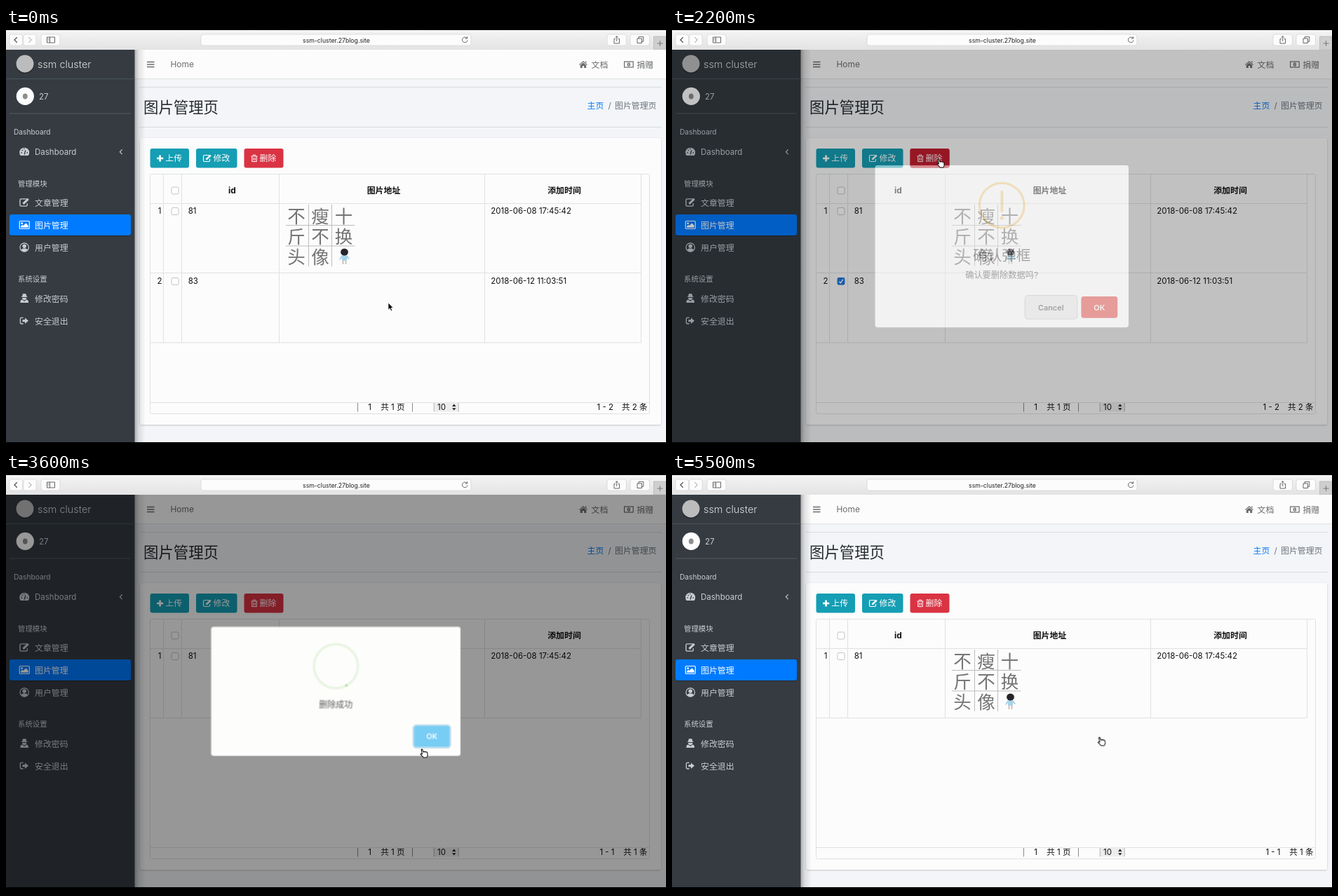
An HTML page that plays this animation: 941 px wide and 595 px high, repeating every 5.8 s.

```html
<!DOCTYPE html>
<html lang="zh-CN">
<head>
<meta charset="utf-8">
<title>ssm cluster</title>
<style>
html, body { margin: 0; width: 100%; height: 100%; overflow: hidden; background: #000; }
svg { display: block; width: 941px; height: 595px; }
text { font: 11.9px Inter, "Noto Sans CJK SC", "Noto Sans CJK", sans-serif; white-space: pre; }
.mid { text-anchor: middle; }
.end { text-anchor: end; }
.nav { fill: #c8ccd3; color: #c8ccd3; }
.nav .latin { font-size: 11.5px; }
.nav .head { font-size: 10.4px; }
.on { fill: #fff; color: #fff; }
.top { fill: #6a6c6e; color: #6a6c6e; }
.btn { fill: #fff; color: #fff; font-weight: 500; }
.btn text { font-weight: 500; }
.cell { fill: #111; }
.cell text { font-size: 11.5px; }
.cell .th { font-size: 11.9px; font-weight: 700; }
.grid { stroke: #dfe1e3; fill: none; }
.box { fill: #fff; stroke: #c4c4c4; }
.pic text { font-size: 25.5px; font-weight: 500; fill: #747474; text-anchor: middle; }
.modal { transform-origin: 470.25px 311.5px; }
.modal .act { font-size: 10.6px; font-weight: 600; text-anchor: middle; }
.tick { fill: #a5dc86; transform-box: fill-box; transform-origin: center; }
#tip { transform: rotate(45deg); }
#long { transform: rotate(-45deg); }
</style>
</head>
<body>
<svg viewBox="0 0 941 595">
  <defs>
    <linearGradient id="bar" x2="0" y2="1">
      <stop stop-color="#f5f4f5"/><stop offset="1" stop-color="#e4e3e4"/>
    </linearGradient>
    <linearGradient id="shade">
      <stop stop-color="#000" stop-opacity=".3"/><stop offset=".4" stop-color="#000" stop-opacity=".1"/><stop offset="1" stop-color="#000" stop-opacity="0"/>
    </linearGradient>
    <filter id="soft" x="-5%" y="-5%" width="110%" height="110%">
      <feDropShadow dx="0" dy=".8" stdDeviation="1.1" flood-opacity=".22"/>
    </filter>
    <g id="edit" fill="none" stroke="currentColor">
      <path d="M3 -4.5H-4Q-5.5 -4.5 -5.5 -3V3Q-5.5 4.5 -4 4.5H2Q3.5 4.5 3.5 3V1" stroke-width="1.2"/>
      <path d="M-1.6 1.6L4.8 -4.4" stroke-width="2.6"/>
    </g>
    <g id="photo">
      <rect x="-7" y="-5.5" width="14" height="11" rx="1.2" fill="none" stroke="currentColor" stroke-width="1.2"/>
      <circle cx="-3.6" cy="-2.3" r="1.4" fill="currentColor"/>
      <path d="M-5.3 3.8V2L-3 -.2L-1.6 1.1L2 -2.5L5.3 .8V3.8Z" fill="currentColor"/>
    </g>
  </defs>

  <!-- browser bar -->
  <rect width="941" height="595"/>
  <rect y="3" width="941" height="28" fill="url(#bar)"/>
  <g fill="#fcfcfc" stroke="#d6d5d6" stroke-width=".8">
    <rect x="5" y="9" width="18.6" height="16" rx="3"/>
    <rect x="24.8" y="9" width="18.4" height="16" rx="3"/>
    <rect x="50" y="9" width="27" height="16" rx="3"/>
    <rect x="278" y="9" width="385" height="16" rx="3"/>
    <rect x="857" y="9" width="27.5" height="16" rx="3"/>
    <rect x="890" y="9" width="27.5" height="16" rx="3"/>
  </g>
  <path d="M923.5 31V12H941V31Z" fill="#cfcecf" stroke="#b9b8b9" stroke-width=".8"/>
  <g fill="none" stroke="#555">
    <path d="M15.8 13.2L12 17L15.8 20.8" stroke-width="1.3"/>
    <path d="M32.4 13.2L36.2 17L32.4 20.8" stroke="#bbb" stroke-width="1.2"/>
    <path d="M58.5 13H69.5V21H58.5ZM62.5 13V21M59.8 15H61.3M59.8 17H61.3" stroke-width=".9"/>
    <path d="M657.2 14.5A3.8 3.8 0 1 0 658 17.5M657.6 12.2V15H654.8" stroke-width=".9"/>
    <path d="M868.8 15.5H867V22H874.5V15.5H872.7M870.75 19V11.8M868.8 13.6L870.75 11.6L872.7 13.6" stroke-width=".9"/>
    <path d="M900 15H906.5V21.5H900ZM902 15V12.6H908.8V19.2H906.5" stroke-width=".9"/>
    <path d="M928.5 22H936.5M932.5 18V26" stroke="#777"/>
  </g>
  <text class="mid" x="471" y="20.6" fill="#222" style="font-size:8.7px">ssm-cluster.27blog.site</text>

  <!-- page -->
  <rect y="31" width="941" height="560" fill="#f3f5f8"/>
  <rect x="183" y="31" width="758" height="41" fill="#fcfcfc"/>
  <path d="M183 72.5H941" stroke="#dfe2e5"/>
  <g class="top">
    <path d="M201 48.5H211.5M201 52H211.5M201 55.5H211.5" stroke="currentColor" stroke-width="1.5"/>
    <text x="234.5" y="56.2">Home</text>
    <path d="M817 52.3L823 47L829 52.3L828.2 53.1L823 48.6L817.8 53.1ZM818.8 53L823 49.5L827.2 53V57H824.2V54H821.8V57H818.8ZM826 47.4H827.5V50L826 48.7Z"/>
    <text x="834.5" y="56.5">文档</text>
    <rect x="881.6" y="48" width="12.6" height="8" fill="none" stroke="currentColor" stroke-width="1.2"/>
    <ellipse cx="887.9" cy="52" rx="2.2" ry="2.8"/>
    <path d="M887.9 50.3V53.6" stroke="#fff"/>
    <text x="899.3" y="56.5">捐赠</text>
  </g>
  <path d="M190 84.5H935M190 141.5H935" stroke="#d9dcdf"/>
  <text x="196" y="120.5" fill="#272b2f" style="font-size:21.4px;font-weight:500">图片管理页</text>
  <text x="828.5" y="114.7" fill="#0a7cf5">主页</text>
  <text x="858.5" y="114.7" fill="#6c757d">/</text>
  <text x="868" y="114.7" fill="#6c757d">图片管理页</text>

  <rect x="191" y="157" width="743" height="409" rx="3" fill="#fcfcfc" filter="url(#soft)"/>
  <rect x="205.5" y="172" width="55.5" height="27.5" rx="3" fill="#159eb4"/>
  <rect x="271" y="172" width="58.5" height="27.5" rx="3" fill="#159eb4"/>
  <rect x="339.5" y="172" width="56" height="27.5" rx="3" fill="#da3343"/>
  <rect id="press" x="339.5" y="172" width="56" height="27.5" rx="3" fill="#c41f30"/>
  <g class="btn">
    <path d="M215 186H224.2M219.6 181.4V190.6" stroke="currentColor" stroke-width="2.6"/>
    <text x="227.3" y="190.4">上传</text>
    <use href="#edit" x="287" y="186"/>
    <text x="295.6" y="190.4">修改</text>
    <path d="M349.5 183H358.5M352.2 182.6V181.2H355.8V182.6M350.7 183.2V190.6H357.3V183.2M352.8 185V189M355.2 185V189" fill="none" stroke="currentColor"/>
    <text x="361.5" y="190.4">删除</text>
  </g>

  <!-- table -->
  <rect class="grid" x="205.5" y="208.5" width="712" height="342" rx="2"/>
  <path class="grid" d="M205.5 250.5H905.5M205.5 349.5H905.5M205.5 534.5H917.5M224.5 209V349.5M250.5 209V349.5M389.5 209V349.5M682.5 209V349.5M905.5 209V349.5"/>
  <g class="cell">
    <text class="th mid" x="322.3" y="235.8">id</text>
    <text class="th mid" x="538.5" y="236">图片地址</text>
    <text class="th mid" x="796" y="236">添加时间</text>
    <rect class="box" x="236" y="227" width="10" height="10" rx="2"/>
    <rect class="box" x="236" y="256.5" width="10" height="10" rx="2"/>
    <text class="mid" x="219" y="265.2">1</text>
    <text x="259.7" y="265.2">81</text>
    <text x="691.3" y="265.2">2018-06-08 17:45:42</text>
    <g id="row2">
      <path class="grid" d="M205.5 449H905.5M224.5 349.5V449M250.5 349.5V449M389.5 349.5V449M682.5 349.5V449M905.5 349.5V449"/>
      <text class="mid" x="219" y="365.2">2</text>
      <text x="259.7" y="365.2">83</text>
      <text x="691.3" y="365.2">2018-06-12 11:03:51</text>
      <rect class="box" x="236" y="356.5" width="10" height="10" rx="2"/>
      <g id="check">
        <rect x="235.7" y="356" width="10.6" height="10.6" rx="2" fill="#2079e0"/>
        <path d="M238.3 361.6L240.3 363.8L243.9 358.6" fill="none" stroke="#fff" stroke-width="1.4"/>
      </g>
    </g>
  </g>
  <g class="pic">
    <path d="M431.5 252V340M464.5 252V340M399 281.5H497.5M399 311H497.5" stroke="#bdbdbd"/>
    <text x="414" y="278">不</text><text x="448" y="278">瘦</text><text x="481.5" y="278">十</text>
    <text x="414" y="307">斤</text><text x="448" y="307">不</text><text x="481.5" y="307">换</text>
    <text x="414" y="336">头</text><text x="448" y="336">像</text>
    <path d="M479 324H486L490 329L488.6 330L486 328V332H479V328L476 331L475 330Z" fill="#a9d3e6"/>
    <path d="M480.5 332V337M484.5 332V337" stroke="#c9b5a8" stroke-width="1.6"/>
    <ellipse cx="482.5" cy="319.8" rx="5.4" ry="5" fill="#26242a"/>
  </g>

  <!-- pager -->
  <path d="M501.5 535V547.5M579.5 535V547.5" stroke="#8a8a8a"/>
  <rect x="610" y="534.5" width="35.5" height="13" rx="1.5" fill="#ededed"/>
  <path d="M610.2 535V547.5M645.2 535V547.5" stroke="#b5b5b5"/>
  <path d="M636 540L638.8 536.6L641.6 540ZM636 542.2L638.8 545.6L641.6 542.2Z" fill="#222"/>
  <g class="cell">
    <text class="mid" x="518.5" y="545.3">1</text>
    <text x="534.3" y="545.3">共 1 页</text>
    <text x="615" y="545">10</text>
    <g id="two"><text class="end" x="866" y="545.3">1 - 2</text><text class="end" x="914.5" y="545.3">共 2 条</text></g>
    <g id="one"><text class="end" x="867.5" y="545.3">1 - 1</text><text class="end" x="914.5" y="545.3">共 1 条</text></g>
  </g>

  <!-- sidebar -->
  <rect x="183" y="31" width="16" height="560" fill="url(#shade)"/>
  <rect y="31" width="183.5" height="560" fill="#353b41"/>
  <path d="M0 72.5H183.5" stroke="#4b545c"/>
  <path d="M5 122H178" stroke="#545c64"/>
  <circle cx="27" cy="52" r="13" opacity=".3"/>
  <circle cx="27" cy="51" r="12.5" fill="#bcbcbc"/>
  <circle cx="27.3" cy="97.3" r="12.6" fill="#fdfdfd"/>
  <ellipse cx="27.3" cy="97.5" rx="3.4" ry="4" fill="#8d8d8d"/>
  <rect x="5" y="267.2" width="173" height="30" rx="3" opacity=".25"/>
  <rect x="5" y="266" width="173" height="30" rx="3" fill="#007bff"/>
  <g class="nav">
    <text x="45" y="57" style="font-size:14.4px;font-weight:300" fill="#dcdedf">ssm cluster</text>
    <text x="47" y="102" class="latin">27</text>
    <text x="11" y="152" style="font-size:10.2px">Dashboard</text>
    <path d="M20.7 182A7 7 0 1 1 31.7 182Z"/>
    <path d="M26.2 180.5L27.8 174.5M21.6 178H23M29.6 178H31M22.8 174L23.8 175M25.2 172.4H26.6" stroke="#353b41" stroke-width="1.3"/>
    <text x="41" y="180.8" class="latin">Dashboard</text>
    <path d="M165.6 173.4L162.4 176.8L165.6 180.2" fill="none" stroke="currentColor" stroke-width="1.2"/>
    <text x="17" y="225.5" class="head">管理模块</text>
    <use href="#edit" transform="translate(26.3 249) scale(1.15)"/>
    <text x="41" y="254.2">文章管理</text>
    <g class="on"><use href="#photo" x="26.3" y="281"/><text x="41" y="286">图片管理</text></g>
    <circle cx="26.2" cy="313" r="6.2" fill="none" stroke="currentColor" stroke-width="1.2"/>
    <circle cx="26.2" cy="311.2" r="2.7"/>
    <path d="M21.8 317.3Q22.3 314.6 24.4 314.4H28Q30.1 314.6 30.6 317.3Q26.2 321 21.8 317.3Z"/>
    <text x="41" y="318">用户管理</text>
    <text x="17" y="362" class="head">系统设置</text>
    <path d="M23 383L23.8 379.6Q26.2 378.6 28.6 379.6L29.4 383L31.2 384H21.2ZM23 385H29.4Q29.4 388 26.2 388.4Q23 388 23 385ZM20.4 392Q20.2 388 23 387.6L26.2 390L29.4 387.6Q32.2 388 32 392Z"/>
    <text x="41" y="390.8">修改密码</text>
    <path d="M24.6 413.4H21.8Q20.4 413.4 20.4 414.8V420.6Q20.4 422 21.8 422H24.6" fill="none" stroke="currentColor" stroke-width="1.3"/>
    <path d="M23.4 416.2H27V413.4L32 417.7L27 422V419.2H23.4Z"/>
    <text x="41" y="422.8">安全退出</text>
  </g>

  <!-- dialogs -->
  <g id="overlay">
    <rect y="31" width="941" height="560" opacity=".4"/>
    <g class="modal" id="confirm">
      <rect x="294.5" y="199" width="351.5" height="225" rx="3.5" fill="#fdfdfd"/>
      <g id="warn">
        <circle cx="470.3" cy="254.7" r="31" fill="none" stroke="currentColor" stroke-width="2.9"/>
        <rect x="468.6" y="234" width="3.6" height="30" rx="1.6" fill="currentColor"/>
        <circle cx="470.4" cy="272.3" r="2.6" fill="currentColor"/>
      </g>
      <text class="mid" x="470.2" y="331.5" fill="#595959" style="font-size:20px;font-weight:500">确认弹框</text>
      <text class="mid" x="470.2" y="356.2" fill="#5e5e5e">确认要删除数据吗?</text>
      <rect x="502.3" y="379.5" width="72.6" height="33" rx="4.5" fill="#eaebec" stroke="#c3c8cc"/>
      <text class="act" x="538.3" y="400.2" fill="#555">Cancel</text>
      <rect x="580.3" y="381" width="50.4" height="30" rx="3.5" fill="#e64942"/>
      <text class="act" x="605.5" y="400.2" fill="#fff">OK</text>
    </g>
    <g class="modal" id="done">
      <rect x="294.5" y="220.5" width="351.5" height="182" rx="3.5" fill="#fdfdfc"/>
      <circle cx="470.3" cy="276" r="31" fill="none" stroke="#a5dc86" stroke-opacity=".25" stroke-width="2.9"/>
      <circle id="spark" cx="485" cy="303" r="1.5" fill="#9bd67c"/>
      <g transform="translate(470.3 276) scale(.735) translate(-40 -40)">
        <rect class="tick" id="tip" height="5" rx="2"/>
        <rect class="tick" id="long" height="5" rx="2"/>
      </g>
      <text class="mid" x="470.2" y="334.8" fill="#5e5e5e">删除成功</text>
      <rect id="focus" x="579.3" y="359" width="52.4" height="32" rx="4.5" fill="#fff" stroke="#b5d3e6" stroke-width="1.6"/>
      <rect x="580.3" y="360" width="50.4" height="30" rx="3.5" fill="#78cdf4"/>
      <text class="act" x="605.5" y="379.2" fill="#fff">OK</text>
    </g>
  </g>

  <!-- pointer -->
  <g id="pointer">
    <path id="arrow" d="M0 0V10.2L2.3 8.1L3.9 11.8L5.6 11L4 7.5H7.1Z" fill="#000" stroke="#fff" stroke-width=".7"/>
    <path id="hand" d="M-.9 .9Q-.5 -.5 .6 .5L2.2 4.2Q3.2 3.2 4 4Q5 3.2 5.8 4.2Q7 3.6 7.6 5L8.2 8Q8.2 10.4 6.8 12H2.2Q.6 9.8 -1.9 7.6Q-1.7 6 .4 7Z" fill="#fff" stroke="#111" stroke-width="1.1" stroke-linejoin="round"/>
  </g>
</svg>
<script>
const LOOP = 5800, TICK = 100;
const OPEN = 2098, DELETED = 3440, CLOSE = 4406;
const tracks = [];

// steps: [ms, styles, easing]
function track(id, steps, easing = 'ease') {
  const all = [[0, steps[0][1]], ...steps, [LOOP, steps.at(-1)[1]]];
  const frames = all.map(([ms, style, e]) => ({ offset: ms / LOOP, easing: e || easing, ...style }));
  const anim = document.getElementById(id).animate(frames, { duration: LOOP, fill: 'both' });
  anim.pause();
  tracks.push(anim);
}

const fade = (id, steps) =>
  track(id, steps.map(([ms, opacity, e]) => [ms, { opacity }, e]));

// hard switches: visible at the start or not, then toggled at each time
function toggle(id, visible, ...times) {
  const steps = [[1, { opacity: +visible }]];
  for (const ms of times) steps.push([ms - 5, { opacity: +(visible = !visible) }]);
  track(id, steps, 'step-end');
}

const pop = (id, start) =>
  track(id, [[3, .5], [135, 1.05], [240, .95], [300, 1]]
    .map(([ms, s]) => [start + ms, { transform: `scale(${s})` }]));

const stroke = (id, steps) =>
  track(id, steps.map(([part, x, y, w]) =>
    [DELETED + part * 750, { x: x + 'px', y: y + 'px', width: w + 'px' }]));

fade('overlay', [[OPEN, 0], [OPEN + 300, 1], [3350, 1, 'linear'], [DELETED, .5], [DELETED + 150, 1], [CLOSE, 1], [CLOSE + 300, 0]]);
fade('confirm', [[OPEN, 0], [OPEN + 200, 1], [3350, 1, 'linear'], [DELETED - 1, .3], [DELETED, 0]]);
fade('done', [[DELETED - 1, 0], [DELETED, .3], [DELETED + 150, 1], [CLOSE, 1], [CLOSE + 200, 0]]);
pop('confirm', OPEN);
pop('done', DELETED);
track('warn', ['#f8d486', '#f8bb86', '#f8d486'].map((color, i) => [OPEN + i * 750, { color }]));

stroke('tip', [[0, 1, 19, 0], [.54, 1, 19, 0], [.7, -8, 37, 50], [.84, 21, 48, 17], [1, 14, 46, 25]]);
stroke('long', [[0, 34, 54, 0], [.65, 34, 54, 0], [.84, 25, 35, 55], [1, 25, 38, 47]]);

toggle('check', false, 1600);
toggle('press', false, 2000, 2300);
toggle('row2', true, DELETED);
toggle('two', true, DELETED);
toggle('one', false, DELETED);
toggle('spark', false, DELETED, 3700);
toggle('focus', true, 4400);
toggle('arrow', true, 2000, 2300, 2700);
toggle('hand', false, 2000, 2300, 2700);

track('pointer', [
  [1100, 545, 392], [1500, 241, 361], [1700, 241, 361], [2000, 380, 187], [2250, 380, 187],
  [2800, 564.5, 390], [3100, 597, 394], [3300, 597, 394], [3600, 593, 394], [3900, 593, 394], [4300, 609.5, 377]
].map(([ms, x, y]) => [ms, { transform: `translate(${x}px, ${y}px)` }]), 'ease-in-out');

const begin = performance.now();
function draw() {
  const now = (performance.now() - begin) % LOOP;
  const at = Math.floor(now / TICK) * TICK;
  for (const anim of tracks) anim.currentTime = at;
  requestAnimationFrame(draw);
}
draw();
</script>
</body>
</html>
```
